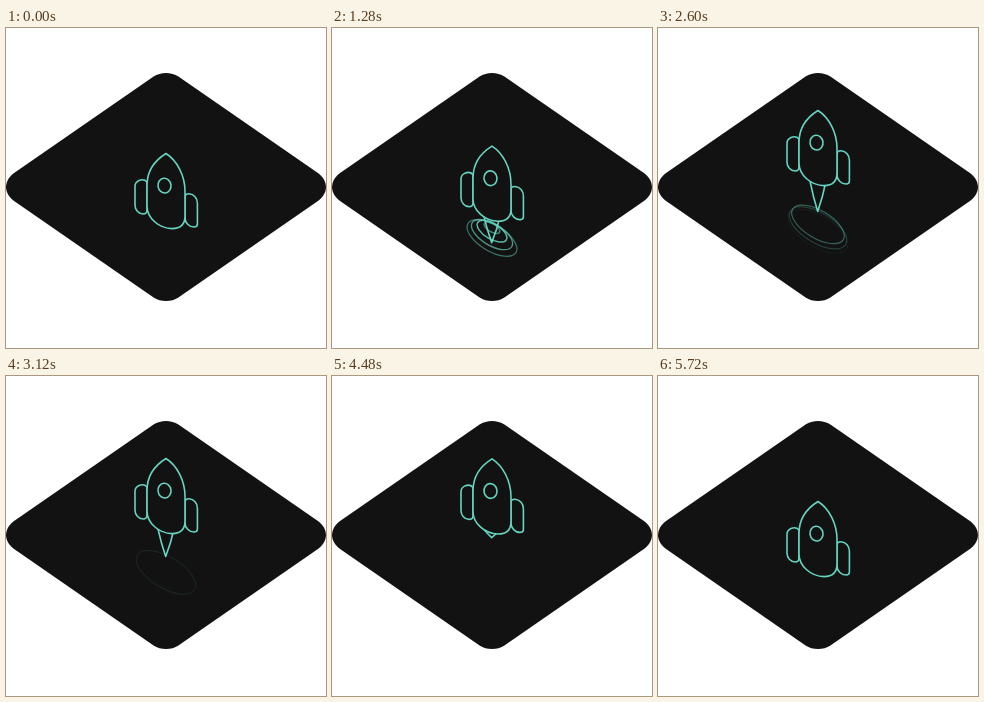
Write an HTML page that moves like this. It is 320 px wide and 320 px high and loops after 5.76 s.

```html
<!DOCTYPE html>
<html lang="en">
<head>
<meta charset="utf-8">
<title>Rocket</title>
<style>
  html, body { margin: 0; width: 100%; height: 100%; overflow: hidden; background: #fff; }
  svg { display: block; width: 100vw; height: 100vh; }
  .line { fill: #121212; stroke: #66d4c0; stroke-width: 1.6; stroke-linejoin: round; stroke-linecap: round; }
  .open { fill: none; }
</style>
</head>
<body>
<svg viewBox="0 0 320 320">
  <path fill="#121212"
    d="M147.6 48.5C154.5 43.8 165.5 43.8 172.4 48.5L311.2 144.4C322.9 152.5 322.9 165.5 311.2 173.6L172.4 269.5C165.5 274.2 154.5 274.2 147.6 269.5L8.8 173.6C-2.9 165.5 -2.9 152.5 8.8 144.4Z"/>
  <g id="rings"></g>
  <g id="rocket">
    <path id="flame" class="line open"/>
    <path class="line" d="M141 154C139 151.8 136 151.3 133 152.5Q129 154.3 129 158.3V177C129 182 132.5 185.8 137 186Q141 186 141 182Z"/>
    <path class="line" d="M179 169Q179 165.7 183 165.8C188 166.2 191.4 170.2 191.4 175.2V196Q191.4 199 188 199C183 199 179 194.5 179 190Z"/>
    <path class="line" d="M160 125.5C148.6 132.5 141 143.5 141 157.5V178C141 190 153 200.5 166 200.6C174.5 200.6 179 196 179 188V163.5C179 147.5 171 132.5 160 125.5Z"/>
    <ellipse class="line" cx="158.5" cy="157.6" rx="6.5" ry="7.4" transform="rotate(-8 158.5 157.6)"/>
  </g>
</svg>
<script>
  const LOOP = 5760, STEP = 40, LIFT = 43;
  const RING_COUNT = 5, RING_START = 100, RING_GAP = 300, RING_LIFE = 2000;

  // time, y of the flame tip relative to the resting rocket
  const FLAME = [[0, 197], [600, 220], [1280, 222], [1880, 221.5], [2240, 224.5],
    [2600, 226.5], [3100, 223.5], [3680, 225], [3960, 227], [4240, 225], [4600, 197], [5760, 197]];

  const $ = id => document.getElementById(id);
  const clamp = v => Math.min(1, Math.max(0, v));
  const smooth = (t, a, b) => {
    const u = clamp((t - a) / (b - a));
    return u * u * (3 - 2 * u);
  };

  function sample(keys, t) {
    const i = Math.max(1, keys.findIndex(k => k[0] >= t));
    const [t0, v0] = keys[i - 1], [t1, v1] = keys[i];
    return v0 + (v1 - v0) * smooth(t, t0, t1);
  }

  // each ring is born a little higher than the one before
  const rings = Array.from({ length: RING_COUNT }, (_, i) => {
    const el = document.createElementNS("http://www.w3.org/2000/svg", "ellipse");
    el.setAttribute("class", "line open");
    el.setAttribute("transform", `translate(160 ${210 - 3.4 * i}) rotate(31)`);
    $("rings").append(el);
    return { el, birth: RING_START + RING_GAP * i };
  });

  function drawRing({ el, birth }, t) {
    const u = (t - birth) / RING_LIFE;
    const live = u > 0 && u < 1;
    el.style.display = live ? "" : "none";
    if (!live) return;
    const size = 1 - (1 - u) ** 2;
    el.setAttribute("rx", 33.7 * size);
    el.setAttribute("ry", 15.7 * size);
    el.style.strokeWidth = 1.7 - 0.8 * u;
    el.style.opacity = clamp(u * 4) * clamp(1.2 * (1 - u));
  }

  function draw(t) {
    const lift = LIFT * (smooth(t, 855, 2470) - smooth(t, 4410, 5670));
    $("rocket").setAttribute("transform", `translate(0 ${-lift})`);

    const tip = sample(FLAME, t);
    const mid = (196 + tip) / 2;
    $("flame").setAttribute("d", `M152 196Q155 ${mid} 159.7 ${tip}Q165 ${mid} 168 196`);
    $("flame").style.display = tip > 197.5 ? "" : "none";

    rings.forEach(r => drawRing(r, t));
  }

  const start = performance.now();
  function tick() {
    const t = (performance.now() - start) % LOOP;
    draw(Math.floor(t / STEP) * STEP);
    requestAnimationFrame(tick);
  }
  draw(0);
  requestAnimationFrame(tick);
</script>
</body>
</html>
```
